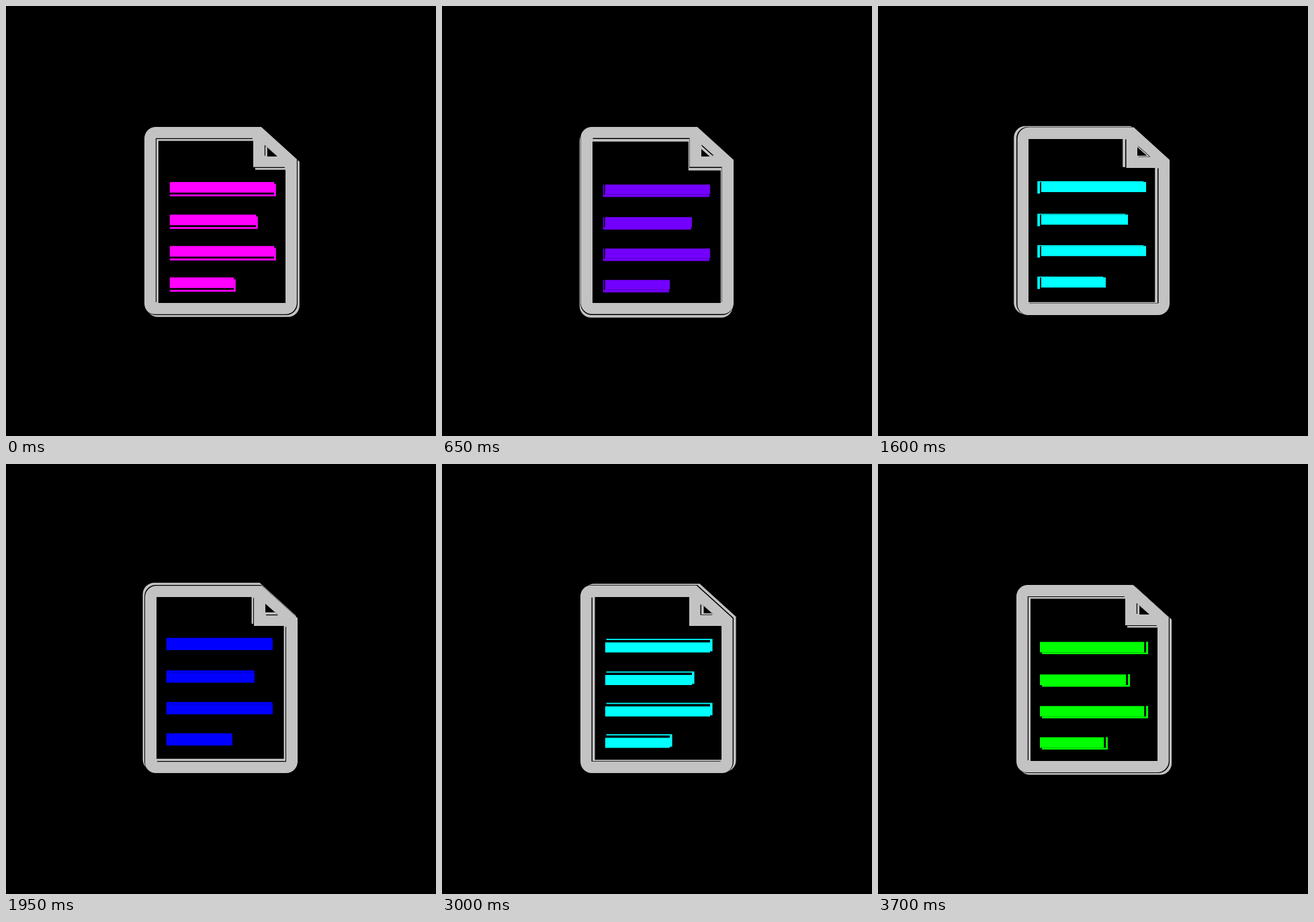
An HTML page with a canvas for the animation above (3.75 s loop, 640 by 640 pixels).

```html
<!DOCTYPE html>
<html lang="en">
<head>
<meta charset="utf-8">
<style>
html, body { margin: 0; width: 100%; height: 100%; overflow: hidden; background: #000; }
canvas { display: block; width: 640px; height: 640px; }
</style>
</head>
<body>
<canvas id="stage" width="640" height="640"></canvas>
<script>
const ctx = document.getElementById('stage').getContext('2d');
const STEP = 50, STEPS = 75, RADIUS = 4;
const GRAY = '#c3c3c3';
const RAD = Math.PI / 180;

// step, hue of the lines, angle of their front layer relative to the back layer
const KEYS = [
  [0, 300, -90], [13, 267, -41], [32, 180, 100], [39, 240, 6],
  [50, 262.6, -31], [60, 180, 88], [74, 120, 94]
];

// top and right edge of each line of the page
const LINES = [[262, 399], [310.5, 372], [357.3, 399], [404, 339]];

function buildPage() {
  const path = new Path2D();
  path.moveTo(224, 180);
  path.lineTo(380, 180);
  path.lineTo(434, 229);
  path.arcTo(434, 460, 416, 460, 17);
  path.arcTo(206, 460, 206, 442, 17);
  path.arcTo(206, 180, 224, 180, 17);
  path.closePath();
  addPolygon(path, [224, 198, 368, 198, 368, 241, 416, 241, 416, 442, 224, 442]);
  addPolygon(path, [386, 208, 404, 224, 386, 224]);
  return path;
}

function addPolygon(path, coords) {
  for (let i = 0; i < coords.length; i += 2) {
    path[i ? 'lineTo' : 'moveTo'](coords[i], coords[i + 1]);
  }
  path.closePath();
}

function buildLines() {
  const path = new Path2D();
  for (const [top, right] of LINES) path.rect(241, top, right - 241, 18.5);
  return path;
}

const page = buildPage();
const lines = buildLines();

function fillAt(path, color, angle, radius) {
  ctx.save();
  ctx.translate(radius * Math.cos(angle * RAD), radius * Math.sin(angle * RAD));
  ctx.fillStyle = color;
  ctx.fill(path, 'evenodd');
  ctx.restore();
}

// Moving back layer, then a fixed cut-out through which the front layer shows.
function drawLayers(path, color, backAngle, frontAngle, frontRadius) {
  fillAt(path, color, backAngle, RADIUS);
  fillAt(path, '#000', 0, 0);
  ctx.save();
  ctx.clip(path, 'evenodd');
  fillAt(path, '#000', 0, 0);
  fillAt(path, color, frontAngle, frontRadius);
  ctx.restore();
}

function lineState(step) {
  const next = KEYS.findIndex(key => key[0] >= step);
  if (next < 1) return KEYS[0].slice(1);
  const a = KEYS[next - 1], b = KEYS[next];
  const part = (step - a[0]) / (b[0] - a[0]);
  return [1, 2].map(i => a[i] + (b[i] - a[i]) * part);
}

function draw(step) {
  ctx.fillStyle = '#000';
  ctx.fillRect(0, 0, 640, 640);
  const angle = 45 + step * 360 / STEPS;
  const [hue, turn] = lineState(step);
  drawLayers(page, GRAY, angle, angle + 180, 1.6);
  drawLayers(lines, `hsl(${hue}, 100%, 50%)`, angle, angle + turn, RADIUS);
}

// The black cut-out base keeps its own path, so redefine fillAt's users once here.
function drawLayersClean(path, color, backAngle, frontAngle, frontRadius) {
  fillAt(path, color, backAngle, RADIUS);
  fillAt(path, '#000', 0, 0);
  ctx.save();
  ctx.clip(path, 'evenodd');
  fillAt(path, color, frontAngle, frontRadius);
  ctx.restore();
}
drawLayers = drawLayersClean;

const start = performance.now();
function tick() {
  draw(Math.floor((performance.now() - start) / STEP) % STEPS);
  requestAnimationFrame(tick);
}
tick();
</script>
</body>
</html>
```
